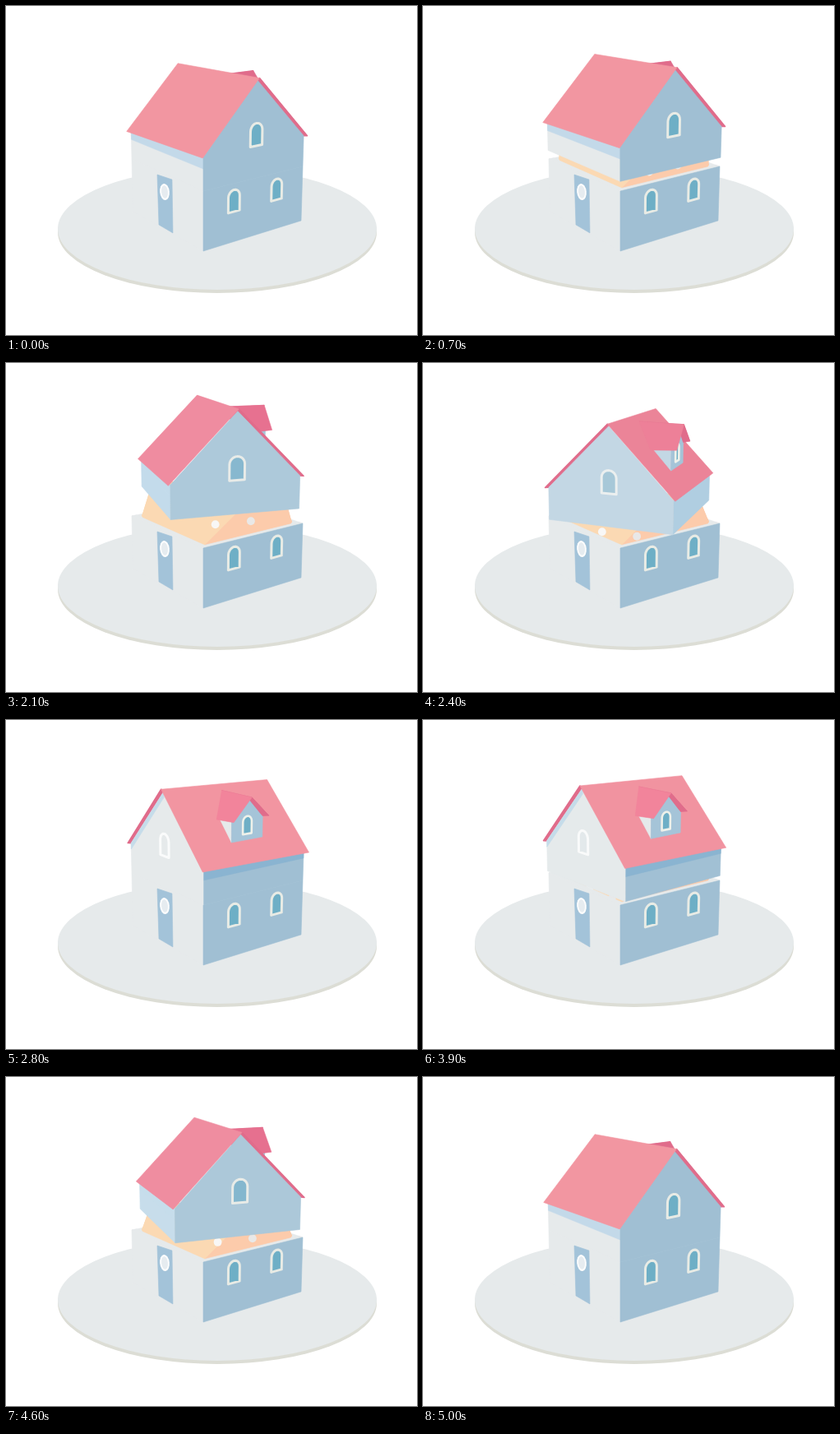
Animation, 500 px wide and 400 px high, one loop 6000 ms. Source, as an HTML page with a canvas:

```html
<!DOCTYPE html>
<html lang="en">
<head>
<meta charset="utf-8">
<title>Turning house</title>
<style>
  html, body { margin: 0; width: 100%; height: 100%; overflow: hidden; background: #fff; }
  canvas { display: block; width: 500px; height: 400px; }
</style>
</head>
<body>
<canvas id="stage" width="500" height="400"></canvas>
<script>
const ctx = document.getElementById('stage').getContext('2d');
const LOOP = 6000, STEP = 100;
const PALE = '#e6eaeb', BLUE = '#a0bfd3', GLASS = '#6eafc6', FRAME = '#e8ebe5', EDGE = '#e06c8b';

// Motion
const part = (t, from, to) => Math.min(1, Math.max(0, (t - from) / (to - from)));
function ease(t, from, to) {
  const x = part(t, from, to);
  return x < .5 ? (2 * x) ** 1.6 / 2 : 1 - (2 - 2 * x) ** 1.6 / 2;
}
const bump = (t, from, to) => Math.sin(Math.PI * part(t, from, to));

const yawAt = t => 90 * (ease(t, 1800, 2800) - ease(t, 3800, 4900));
const liftAt = t =>
  .533 * (ease(t, 500, 1050) - ease(t, 1800, 2800)) +
  .12 * bump(t, 800, 1200) - .03 * bump(t, 1200, 1700) +
  .37 * (ease(t, 3800, 4200) - ease(t, 4400, 5000));

// Colours that change with the turn, as { yaw: colour }
const channels = color => [1, 3, 5].map(i => parseInt(color.slice(i, i + 2), 16));
function tint(stops, yaw) {
  const keys = Object.keys(stops).map(Number);
  const lo = keys.filter(k => k <= yaw).pop() ?? keys[0];
  const hi = keys.find(k => k > yaw) ?? lo;
  const mix = hi === lo ? 0 : (yaw - lo) / (hi - lo);
  const end = channels(stops[hi]);
  return `rgb(${channels(stops[lo]).map((c, i) => Math.round(c + (end[i] - c) * mix)).join()})`;
}
const GABLE = { 0: BLUE, 19: '#adc9da', 52: '#bad3e2', 84: '#e4e9eb', 90: PALE };
const SIDE_L = { 0: PALE, 19: '#c3dbeb' };
const SIDE_R = { 52: '#b3d1e4', 90: BLUE };
const ROOF_L = { 0: '#f296a1', 19: '#ef8ca0' };
const ROOF_R = { 52: '#ea8096', 90: '#f295a1' };
const DORMER = { 0: EDGE, 19: '#e77190', 52: '#ec7f97', 90: '#f2849b' };
const PANE = { 0: GLASS, 19: '#86b8cf', 52: '#99c0d3', 84: '#e0e8ea', 90: PALE };
const SASH = { 0: FRAME, 52: '#e8ecec', 90: '#fafbfb' };

// Perspective camera: the ground square and wall height are the units
function project(x, y, z) {
  const w = 1 + .114 * x + .148 * y - .0184 * z;
  return [(240 + 159.93 * x - 62.75 * y - 4.416 * z) / w,
          (298 - 7.25 * x - 10.77 * y - 77.14 * z) / w];
}

// Turns and lifts a point around the middle of the house; it swells slightly as it rises
function turner(yaw, lift, swell = 1) {
  const c = swell * Math.cos(yaw * Math.PI / 180), s = swell * Math.sin(yaw * Math.PI / 180);
  return (u, v, z) => {
    const a = u - .5, b = v - .5;
    return project(.5 + a * c + b * s, .5 - a * s + b * c, 1 + (z - 1) * swell + lift);
  };
}

// Drawing helpers
function poly(pts, fill, line = fill, width = .6) {
  ctx.beginPath();
  pts.forEach(([x, y]) => ctx.lineTo(x, y));
  ctx.closePath();
  ctx.fillStyle = fill;
  ctx.fill();
  ctx.strokeStyle = line;
  ctx.lineWidth = width;
  ctx.stroke();
}

function ellipse(x, y, rx, ry, fill, turn = 0) {
  ctx.beginPath();
  ctx.ellipse(x, y, rx, ry, turn, 0, 2 * Math.PI);
  ctx.fillStyle = fill;
  ctx.fill();
}

function faded(alpha, paint) {
  if (alpha <= 0) return;
  ctx.globalAlpha = Math.min(1, alpha);
  paint();
  ctx.globalAlpha = 1;
}

const facing = pts => pts.reduce((sum, [x, y], i) => {
  const [nx, ny] = pts[(i + 1) % pts.length];
  return sum + x * ny - nx * y;
}, 0) > 0;

// Arched window; at(h, z) maps the wall plane to the stage
function arch(at, mid, z0, w, h, glass, frame, line = 3) {
  const r = w / 2, rise = r * 2.1, pts = [at(mid - r, z0)];
  for (let k = 0; k <= 12; k++) {
    const a = Math.PI * (1 - k / 12);
    pts.push(at(mid + r * Math.cos(a), z0 + h - rise + rise * Math.sin(a)));
  }
  pts.push(at(mid + r, z0));
  poly(pts, glass, frame, line);
}

function ground() {
  ellipse(257, 275, 194, 74, '#dcddd5');
  ellipse(257, 271, 194, 74, PALE);
}

// The body spans from a fixed base to a top that turns with the lid
function head(yaw, lift) {
  const lo = .085, hi = .915, corners = [[lo, lo], [hi, lo], [hi, hi], [lo, hi]];
  const ring = (deg, z) => corners.map(([u, v]) => turner(deg, 0)(u, v, z));
  const base = ring(0, 1.02), top = ring(yaw, 1.03 + lift);
  const skin = ctx.createLinearGradient(242, 220, 243, 221);
  skin.addColorStop(0, '#fbd9b3');
  skin.addColorStop(1, '#fccbab');
  for (let i = 0; i < 4; i++) {
    for (let j = 0; j < 4; j++) {
      poly([base[i], base[(i + 1) % 4], top[(j + 1) % 4], top[j]], skin, skin, 9);
    }
  }
  poly(top, skin);
  const eye = turner(yaw, 0), z = 1 + .5 * lift - .002 * yaw;
  ellipse(...eye(.38, .14, z), 4.9, 5, '#f8f7f6');
  ellipse(...eye(.67, .14, z), 4.9, 5, '#e9e8e7');
}

function basementBack() {
  poly([project(0, 0, 1), project(1, 0, 1), project(1, 1, 1), project(0, 1, 1)], PALE);
}

function basementFront() {
  const k = .045;
  poly([project(0, 0, 1), project(k, k, 1), project(k, 1, 1), project(0, 1, 1)], PALE);
  poly([project(0, 0, 1), project(k, k, 1), project(1, k, 1), project(1, 0, 1)], PALE);
  poly([project(0, 1, 1), project(0, 0, 1), project(0, 0, 0), project(0, 1, 0)], PALE);
  poly([project(0, 0, 1), project(1, 0, 1), project(1, 0, 0), project(0, 0, 0)], BLUE);
  const wall = (x, z) => project(x, 0, z);
  [.288, .72].forEach(x => arch(wall, x, .52, .11, .372, GLASS, FRAME));
  poly([[184, 205], [202, 211], [203, 276], [186, 266]], '#a3c3d9');
  ellipse(193, 226, 5.8, 10, '#fdfdfd', -.1);
  ellipse(193, 226, 3.9, 7.8, '#e6ecf0', -.1);
}

function dormer(at, yaw) {
  const f = .86, out = .91, lo = .37, mid = .525, hi = .68, back = .54;
  const front = [at(f, lo, 1.82), at(f, lo, 2.17), at(f, mid, 2.53), at(f, hi, 2.17), at(f, hi, 1.82)];
  const tip = at(out, mid, 2.55), ridge = at(back, mid, 2.55);
  poly([ridge, at(.71, hi + .02, 2.2), at(out, hi + .02, 2.2), tip], EDGE);
  poly([at(f, lo, 2.17), at(.709, lo, 2.17), at(f, lo, 1.82)], tint(GABLE, yaw));
  poly(front, '#a5c4d8');
  if (facing(front)) arch((v, z) => at(f, v, z), mid, 1.92, .088, .3, GLASS, '#eef1ea', 2.6);
  poly([tip, at(out, hi + .02, 2.2), at(f, hi, 2.18), at(f, mid, 2.53)], EDGE);
  poly([ridge, tip, at(out, lo - .02, 2.18), at(.7, lo - .02, 2.15)], tint(DORMER, yaw));
}

function lid(yaw, lift) {
  const at = turner(yaw, lift, 1 + .04 * lift);
  const near = -.02, far = 1.04, wallZ = 1.55;
  const apex = at(.5, -.025, 2.68), rear = at(.5, far, 2.62), peak = at(.5, 0, 2.64);
  const eave = (u, v) => at(u, v, 1.55 - .05 * v);
  const slopeL = [rear, apex, eave(-.02, near), eave(-.02, far)];
  const slopeR = [apex, rear, eave(1.02, far), eave(1.02, near)];
  const side = (u, from, to, low) => [at(u, from, wallZ), at(u, to, wallZ - .04 * (from === 0)), at(u, to, low), at(u, from, low)];
  const wall = (u, low) => [at(u, u, wallZ - .04 * u), at(u, 1 - u, wallZ - .04 * (1 - u)), at(u, 1 - u, low), at(u, u, low)];
  const leftWall = low => [at(0, 1, 1.5), at(0, 0, wallZ), at(0, 0, low), at(0, 1, low)];
  const rightWall = low => [at(1, 0, wallZ), at(1, 1, 1.5), at(1, 1, low), at(1, 0, low)];
  const rake = (u, over) => poly([apex, eave(over, near), at(u, 0, wallZ), peak], EDGE, EDGE, 1.5);
  const showL = facing(slopeL), showR = facing(slopeR);

  if (!showR) dormer(at, yaw);
  if (facing(leftWall(1))) {
    poly(leftWall(1), tint(SIDE_L, yaw));
    faded(1 - yaw / 20, () => poly(leftWall(1.36), '#c3d9e9'));
  }
  if (facing(rightWall(1))) {
    poly(rightWall(1), tint(SIDE_R, yaw));
    faded((yaw - 60) / 20, () => poly(rightWall(1.4), '#8ab4d1'));
  }
  if (!showL) rake(0, -.02);
  if (!showR) rake(1, 1.02);

  poly([at(0, 0, 1), at(0, 0, wallZ), peak, at(1, 0, wallZ), at(1, 0, 1)], tint(GABLE, yaw));
  faded((yaw - 60) / 20, () =>
    poly([at(0, 0, wallZ), peak, at(.5, 0, 2.54), at(0, 0, wallZ - .11)], '#c5dcea'));
  arch((u, z) => at(u, 0, z), .5, 1.55, .118, .38, tint(PANE, yaw), tint(SASH, yaw));

  if (showL) poly(slopeL, tint(ROOF_L, yaw));
  if (showR) {
    poly(slopeR, tint(ROOF_R, yaw));
    dormer(at, yaw);
  }
}

function draw(t) {
  const yaw = yawAt(t), lift = liftAt(t);
  ctx.fillStyle = '#fff';
  ctx.fillRect(0, 0, 500, 400);
  ctx.lineJoin = 'round';
  ground();
  basementBack();
  if (lift > .001) head(yaw, lift);
  basementFront();
  lid(yaw, lift);
}

const start = performance.now();
function tick() {
  const t = (performance.now() - start) % LOOP;
  draw(Math.floor(t / STEP) * STEP);
  requestAnimationFrame(tick);
}
tick();
</script>
</body>
</html>
```
